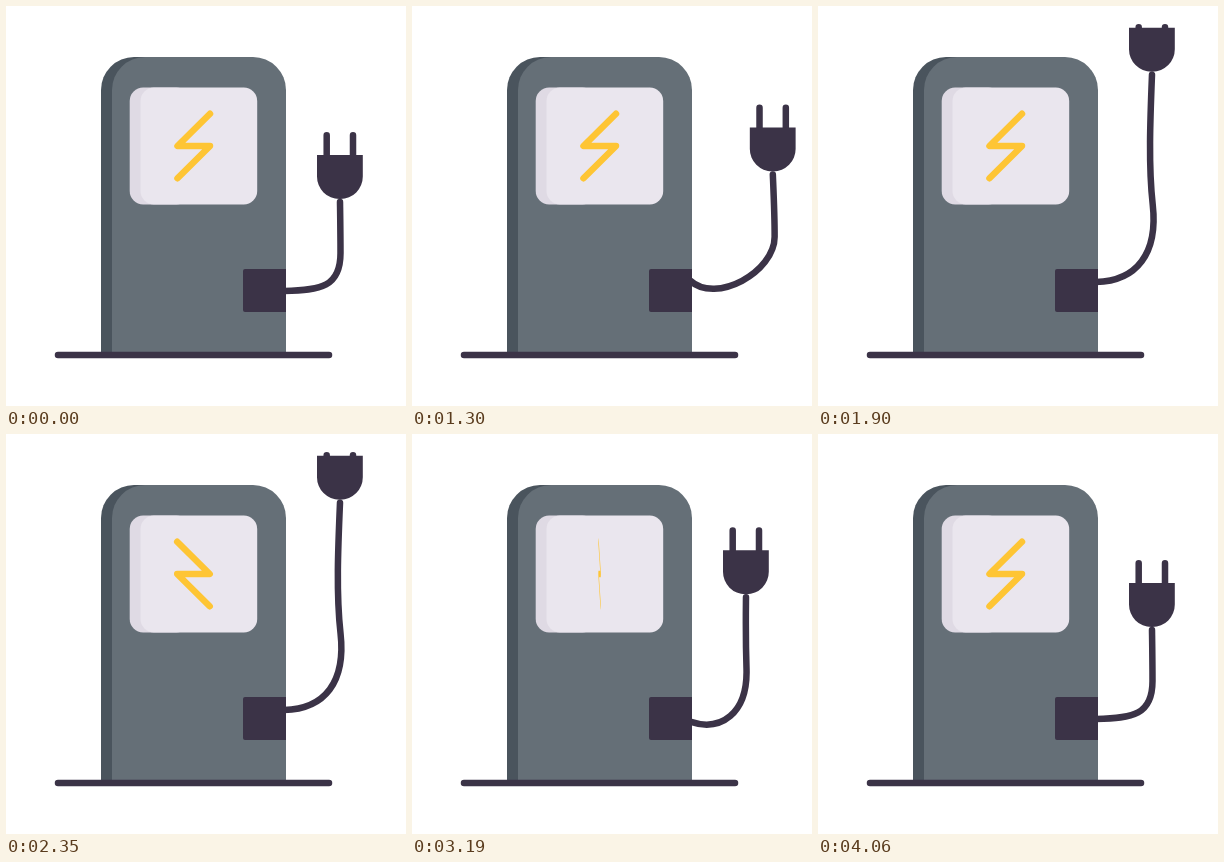
Write an HTML page that moves like this. It is 400 px wide and 400 px high and loops after 4090 ms.

```html
<!DOCTYPE html>
<html lang="en">
<head>
<meta charset="utf-8">
<title>Charging station</title>
<style>
  html, body { margin: 0; width: 100%; height: 100%; overflow: hidden; background: #fff; }
  svg { display: block; width: 100vw; height: 100vh; }
  .line { fill: none; stroke: #3b3347; stroke-width: 6.5; stroke-linecap: round; stroke-linejoin: round; }
  .dark { fill: #3b3347; }
  #bolt { stroke: #fec534; }
</style>
</head>
<body>
<svg viewBox="0 0 400 400">
  <path fill="#4a545d" d="M95 347V84a33 33 0 0 1 33-33H200V347Z"/>
  <path fill="#656f77" d="M106 347V84a33 33 0 0 1 33-33H247a33 33 0 0 1 33 33V347Z"/>
  <rect fill="#dfdae4" x="123.7" y="81.5" width="60" height="117" rx="13.5"/>
  <rect fill="#eae6ee" x="134.5" y="81.5" width="116.7" height="117" rx="13.5"/>
  <path id="bolt" class="line" d="M204 107.7L171.5 140H204L171.5 172.2"/>
  <path class="line" d="M52 349H323"/>
  <path id="cable" class="line"/>
  <path class="dark" d="M280 263V306H239a2 2 0 0 1-2-2V265a2 2 0 0 1 2-2Z"/>
  <path id="prongs" class="line"/>
  <path id="body" class="dark" d="M-23 0H22.8V21.5A22.4 22.4 0 0 1 .4 44H-.6A22.4 22.4 0 0 1-23 21.5Z"/>
</svg>
<script>
const LOOP = 4090, STEP = 30, START = 1030;
const RISE = 1000, DOCK = 1450, FALL = 2770, LAND = 3880;
const REST = { x: 334, y: 149 }, HEIGHT = 127.3, SOCKET = 18;
const [bolt, cable, prongs, body] =
  ['bolt', 'cable', 'prongs', 'body'].map(id => document.getElementById(id));

const progress = (t, from, to) => Math.min(1, Math.max(0, (t - from) / (to - from)));
const smooth = (t, from, to) => (1 - Math.cos(Math.PI * progress(t, from, to))) / 2;
const pulse = (t, from, to, skew = 1) => Math.sin(Math.PI * progress(t, from, to) ** skew);

// The plug loops out to the right on its way up and eases straight back down.
function plugOffset(t) {
  if (t >= DOCK) {
    const u = progress(t, FALL, LAND);
    return [0, -HEIGHT * Math.exp(-3.44 * u) * (1 - u ** 3)];
  }
  const u = progress(t, RISE, DOCK) ** 1.65, w = 1 - u;
  const a = 3 * w * w * u, b = 3 * w * u * u;
  return [45 * a + 27 * b, 45 * a - 70 * b - HEIGHT * u ** 3];
}

// Lift straightens the cable, swing throws it outwards, sag lets it hang.
function cablePath(t, x, top, dx, lift) {
  const swing = pulse(t, START, 1910) + pulse(t, FALL, 3150);
  const sag = 1.2 * pulse(t, RISE, 1500) + 1.25 * pulse(t, FALL, 4060, .65);
  const mx = 334.5 + .85 * dx + 6.5 * swing;
  const my = 247 - 48 * lift - 7 * swing;
  const ax = 334.5 + .85 * dx + 5.5 * lift + 5 * swing;
  const ay = 281 - 33 * lift - 18 * swing + 6 * sag;
  const bx = 315 + 4 * lift - 6 * swing - 6 * sag;
  const by = 284 - 9 * lift + 2 * swing + 13 * sag;
  const end = 285 - 9 * lift + sag * (4 - 14 * swing);
  const reach = Math.min(.8, (my - top) / 100);
  const hx = mx - reach * (ax - mx), hy = my - reach * (ay - my);
  return `M${x} ${top}C${(x + hx) / 2} ${top + .35 * (my - top)} ${hx} ${hy} ${mx} ${my}` +
    `C${ax} ${ay} ${bx} ${by} 278 ${end}`;
}

function draw(t) {
  const [dx, dy] = plugOffset(t);
  const x = REST.x + dx, y = REST.y + dy;
  const tall = 1 - .115 * pulse(t, 1420, 1640, .6);
  body.setAttribute('transform', `translate(${x} ${y}) scale(1 ${tall})`);

  // The prongs slide in once they meet the socket.
  const tip = Math.max(SOCKET, y - 23) + 3.25;
  prongs.setAttribute('d', [-13.3, 13].map(o => `M${x + o} ${tip}V${Math.max(tip, y + 2)}`).join(''));

  cable.setAttribute('d', cablePath(t, x, y + 44 * tall + 3, dx, -dy / HEIGHT));

  const flip = 1 - 2 * (smooth(t, 1930, 2350) - smooth(t, 2960, 3440));
  bolt.setAttribute('transform', `translate(187.6 0) scale(${flip} 1) translate(-187.6 0)`);
}

const origin = performance.now();
function tick() {
  const t = (performance.now() - origin) % LOOP;
  draw(t < START ? 0 : START + Math.floor((t - START) / STEP) * STEP);
  requestAnimationFrame(tick);
}
tick();
</script>
</body>
</html>
```
